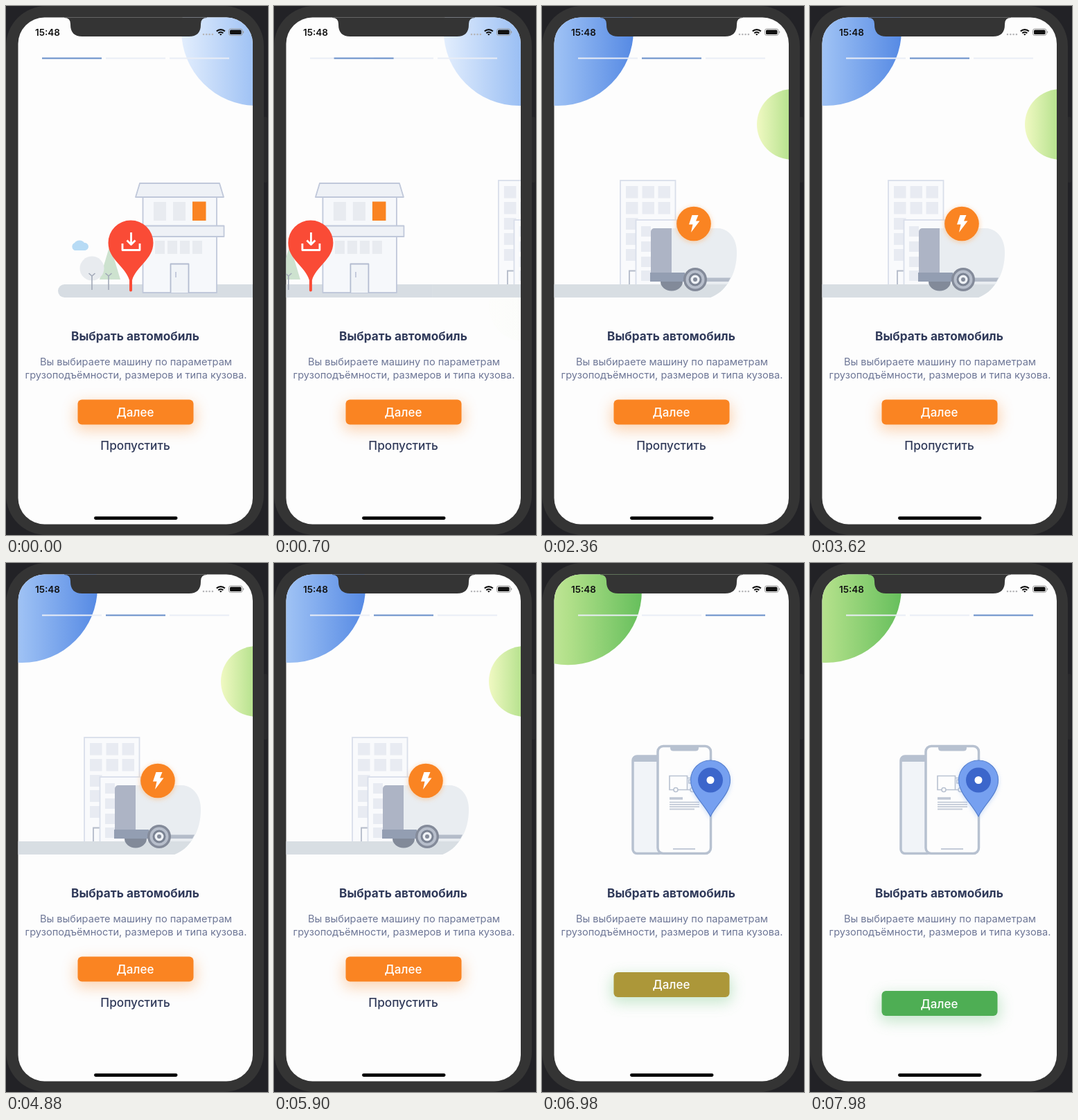
Animation, 378 px wide and 764 px high, one loop 8000 ms. Source, as an HTML page:

```html
<!DOCTYPE html>
<html lang="ru">
<head>
<meta charset="utf-8">
<title>Onboarding</title>
<style>
  html, body { margin: 0; width: 100%; height: 100%; overflow: hidden; background: #222226; }
  svg { display: block; width: 100vw; height: 100vh; }
  text { font-family: Inter, Roboto, sans-serif; text-anchor: middle; }
</style>
</head>
<body>
<svg viewBox="0 0 378 764" xmlns="http://www.w3.org/2000/svg">
  <defs>
    <clipPath id="screen"><rect x="17.500" y="16.500" width="338.500" height="732" rx="38"/></clipPath>
    <linearGradient id="blueFill">
      <stop offset="0" stop-color="#e3eefd"/>
      <stop offset=".5" stop-color="#9cc0f4"/>
      <stop offset="1" stop-color="#568ae4"/>
    </linearGradient>
    <linearGradient id="greenFill">
      <stop offset="0" stop-color="#f0f9c2"/>
      <stop offset=".5" stop-color="#b2e08a"/>
      <stop offset="1" stop-color="#66bf5c"/>
    </linearGradient>
    <filter id="glow" x="-30%" y="-120%" width="160%" height="340%"><feGaussianBlur stdDeviation="10"/></filter>
    <filter id="soft" x="-40%" y="-40%" width="180%" height="180%"><feGaussianBlur stdDeviation="3"/></filter>
  </defs>

  <rect width="378" height="764" fill="#222226"/>
  <rect x="371" y="160" width="6" height="95" rx="2" fill="#29292b"/>
  <rect width="372" height="764" rx="58" fill="#343434"/>

  <g clip-path="url(#screen)">
    <rect x="17" y="16" width="340" height="733" fill="#fdfdfd"/>
    <circle id="green" fill="url(#greenFill)"/>
    <circle id="blue" fill="url(#blueFill)" cy="35" r="109"/>

    <g id="house" stroke-linejoin="round">
      <path d="M356 402H84.500a9.500 9.500 0 0 0 0 19H356z" fill="#d7dde3"/>
      <path d="M99 353a6 6 0 0 1 0-11 8 7 0 0 1 14 0 5.500 5.500 0 0 1 1 11z" fill="#b7dbf5"/>
      <path d="M150 345L135 395H165z" fill="#cde2cf"/>
      <circle cx="124" cy="379" r="17.500" fill="#e8ebef"/>
      <path d="M124 410V390M119.500 386l4.500 4 4.500-4M148 410V390M143.500 386l4.500 4 4.500-4" fill="none" stroke="#a2a9b8" stroke-width="1.600"/>
      <g fill="#f6f8fb" stroke="#c0c8da" stroke-width="1.800">
        <path d="M197.500 276H304V414H197.500z"/>
        <path d="M187 276l6-20H308l6 20z" fill="#eef1f6"/>
        <path d="M190 317.500H314.500V333H190z" fill="#eef1f6"/>
        <path d="M237.500 414V372.500H263.500V414" fill="#f1f4f8" stroke="#b3bcd0"/>
        <path d="M245 384v8"/>
      </g>
      <g id="houseWindows" fill="#e8ebf0"></g>
      <rect x="269" y="282.500" width="19.500" height="27.500" fill="#fa8422"/>
      <path d="M180 309.500a32.500 32.500 0 0 1 32.500 32.500c0 24-25 34-30.500 54v14.500a2 2 0 0 1-4 0V396c-5.500-20-30.500-30-30.500-54A32.500 32.500 0 0 1 180 309.500z" fill="#fa4b36"/>
      <path d="M168 343v9.500H193V343M180.500 327v17M174.500 338.500l6 6 6-6" fill="none" stroke="#fff" stroke-width="2.800"/>
    </g>

    <g id="truck">
      <g fill="#f9fafc" stroke="#d9deea" stroke-width="1.800">
        <rect x="113" y="252" width="79.500" height="152"/>
        <g id="towerWindows" fill="#e8ebf2" stroke="none"></g>
        <path d="M126 403V382.500H135" fill="none" stroke="#b4bbc9"/>
        <rect x="135.500" y="309" width="59" height="95"/>
        <g id="blockWindows" fill="#e8ebf2" stroke="none"></g>
      </g>
      <path d="M187 321H252c18 0 29 15 29 35 0 30-13 54-38 65H187z" fill="#e9edf1"/>
      <path d="M18 402H267c-6 9-14 15-24 19H18z" fill="#d8dee3"/>
      <path d="M171 398a16 13.500 0 0 0 32 0z" fill="#828a99"/>
      <path d="M187 321H162a5 5 0 0 0-5 5v72H206V385H187z" fill="#adb4c5"/>
      <path d="M156 385H206v13H156z" fill="#939eb2"/>
      <path d="M232 392.500H272l-3 5.500H232z" fill="#b4bcc9"/>
      <circle cx="221" cy="395" r="17" fill="#848b9a"/>
      <circle cx="221" cy="395" r="13.500" fill="#b7becb"/>
      <circle cx="221" cy="395" r="8" fill="#eef1f5" stroke="#7b8393" stroke-width="3"/>
      <circle cx="221" cy="395" r="3" fill="#848b9a"/>
      <circle cx="219" cy="316" r="26" fill="#fbb778" opacity=".5" filter="url(#soft)"/>
      <circle cx="219" cy="314.500" r="24.800" fill="#fa8422"/>
      <path d="M216.500 302h9l-3.500 8.500h5.500L215 327l2.500-11.500H212z" fill="#fff"/>
    </g>

    <g id="phones">
      <rect x="131" y="279" width="44" height="140.500" rx="6" fill="#f1f4f8" stroke="#b7c1d0" stroke-width="3.500"/>
      <path d="M131 287v-3q0-5 5-5H168v8z" fill="#b7c1d0"/>
      <rect x="167" y="264.500" width="76.500" height="155" rx="8" fill="#fdfdfd" stroke="#b7c1d0" stroke-width="3.500"/>
      <path d="M185 265H226v2q0 4.500-4.500 4.500h-32q-4.500 0-4.500-4.500z" fill="#b7c1d0"/>
      <g fill="#fdfdfd" stroke="#b9c2d1" stroke-width="1.600">
        <path d="M184 307.500H209.500V327.500H184zM209.500 310.500H220l3 7v10H209.500zM212 313h6v5h-6z"/>
        <circle cx="193" cy="327.500" r="3"/><circle cx="217" cy="327.500" r="3"/>
      </g>
      <path d="M184 340H203" stroke="#bfc7d5" stroke-width="3.500"/>
      <path d="M184 345.500H227M184 348.800H227M184 352H227" stroke="#b9c2d1" stroke-width="1.500"/>
      <path d="M184 355.500H220M189 413H221" stroke="#c3cbd8" stroke-width="2"/>
      <path d="M243 369c-10-20-29-33-29-53a29 29 0 0 1 58 0c0 20-19 33-29 53z" fill="#9fc0f2" opacity=".55" filter="url(#soft)"/>
      <path d="M243 366c-9-18-28.500-33-28.500-52.500a28.500 28.500 0 0 1 57 0C271.500 333 252 348 243 366z" fill="#76a0f0" stroke="#5780cf" stroke-width="1.200"/>
      <circle cx="243" cy="313.500" r="18" fill="#3c66cb"/>
      <circle cx="243" cy="313.500" r="5.500" fill="#fff"/>
    </g>

    <path d="M52 75.500H138M144 75.500H230M236 75.500H322" stroke="#e9edf6" stroke-width="2"/>
    <path id="active" d="M52 75.500H138" stroke="#698fca" stroke-width="2"/>

    <text x="186.500" y="483" font-size="17.200" font-weight="700" fill="#303a5a">Выбрать автомобиль</text>
    <g font-size="14.600" fill="#6d7696">
      <text x="187.500" y="519">Вы выбираете машину по параметрам</text>
      <text x="187.500" y="537.500">грузоподъёмности, размеров и типа кузова.</text>
    </g>
    <text id="skip" x="186.500" y="640.500" font-size="17.200" font-weight="500" fill="#303a5a">Пропустить</text>
    <g id="button">
      <rect id="halo" x="100" y="573" width="174" height="40" rx="10" opacity=".4" filter="url(#glow)"/>
      <rect id="face" x="103.500" y="568.500" width="167" height="36" rx="6"/>
      <text x="186.500" y="593" font-size="17" font-weight="500" fill="#fff">Далее</text>
    </g>

    <path d="M84 16H290v1q-9 0-9 9v1q0 17-17 17H110q-17 0-17-17v-1q0-9-9-9z" fill="#343434"/>
    <text x="60" y="42.500" font-size="13.500" font-weight="600" fill="#111">15:48</text>
    <path d="M285 41H300" stroke="#b5b5b8" stroke-width="2.600" stroke-linecap="round" stroke-dasharray="0 4.300"/>
    <g fill="none" stroke="#111" stroke-width="2.200">
      <path d="M303.800 36.600a8.400 8.400 0 0 1 12 0M306.300 39.200a5 5 0 0 1 7 0"/>
      <path d="M309.800 42.600l-1.700-1.700a2.500 2.500 0 0 1 3.400 0z" fill="#111" stroke="none"/>
    </g>
    <rect x="321.500" y="33" width="19.500" height="9.500" rx="2.800" fill="none" stroke="#999" stroke-width="1"/>
    <rect x="323" y="34.500" width="16.500" height="6.500" rx="1.500" fill="#111"/>
    <path d="M342.300 36.200q1.400 1.500 0 3z" fill="#999" stroke="#999" stroke-width=".6"/>
    <rect x="127" y="737.300" width="120.500" height="4.600" rx="2.300" fill="#050505"/>
  </g>
</svg>
<script>
const LOOP = 8000, PAGE = 338, STEP = 92;
// Taps on the button, and how long each part takes to respond
const TAPS = [608, 6267];
const PAGE_MS = 395, CIRCLE_MS = 836, BUTTON_MS = 1510;

const $ = id => document.getElementById(id);
const clamp = v => Math.max(0, Math.min(1, v));
const mix = (a, b, p) => a + (b - a) * p;
const mixRgb = (a, b, p) => `rgb(${a.map((v, i) => Math.round(mix(v, b[i], p)))})`;
const set = (id, attrs) => {
  for (const key in attrs) $(id).setAttribute(key, attrs[key]);
};

function bezier(x1, y1, x2, y2) {
  const at = (a, b, s) => 3 * (1 - s) * (1 - s) * s * a + 3 * (1 - s) * s * s * b + s * s * s;
  return x => {
    if (x <= 0 || x >= 1) return clamp(x);
    let lo = 0, hi = 1;
    for (let i = 0; i < 24; i++) {
      const mid = (lo + hi) / 2;
      if (at(x1, x2, mid) < x) lo = mid; else hi = mid;
    }
    return at(y1, y2, lo);
  };
}
const ease = bezier(.25, .1, .25, 1);
const easeInOut = bezier(.42, 0, .58, 1);

function addWindows(id, xs, ys, w, h) {
  $(id).innerHTML += ys.map(y => xs.map(x =>
    `<rect x="${x}" y="${y}" width="${w}" height="${h}"/>`).join('')).join('');
}
addWindows('houseWindows', [213, 241], [283], 18, 27);
addWindows('houseWindows', [215, 233, 251, 269], [339], 14, 19);
addWindows('towerWindows', [121, 144.5, 167.5], [260, 283], 17.5, 17.5);
addWindows('towerWindows', [121], [306, 328, 351], 17.5, 17);
addWindows('blockWindows', [143], [318, 340, 362, 382], 14, 15);

function render(t) {
  const [first, second] = TAPS;
  const page = TAPS.reduce((sum, tap) => sum + ease((t - tap) / PAGE_MS), 0);
  ['house', 'truck', 'phones'].forEach((id, i) =>
    set(id, { transform: `translate(${(i - page) * PAGE} 0)` }));
  set('active', { transform: `translate(${page * STEP} 0)` });

  const a = easeInOut((t - first) / CIRCLE_MS);
  const b = easeInOut((t - second) / CIRCLE_MS);
  set('blue', { cx: mix(362, 23, a) - 250 * b });
  set('green', {
    cx: mix(361, 23, b),
    cy: mix(mix(440, 171, a), 35, b),
    r: mix(51, 109, b),
    opacity: a
  });

  const last = t >= second;
  const drop = easeInOut((t - second) / BUTTON_MS);
  set('button', { transform: `translate(0 ${49.5 * drop})` });
  set('face', { fill: mixRgb([250, 132, 34], [78, 174, 84], drop) });
  set('halo', { fill: last ? '#7cc98a' : '#fa9a4a' });
  set('skip', { visibility: last ? 'hidden' : 'visible' });
}

const start = performance.now();
function tick() {
  render((performance.now() - start) % LOOP);
  requestAnimationFrame(tick);
}
tick();
</script>
</body>
</html>
```
